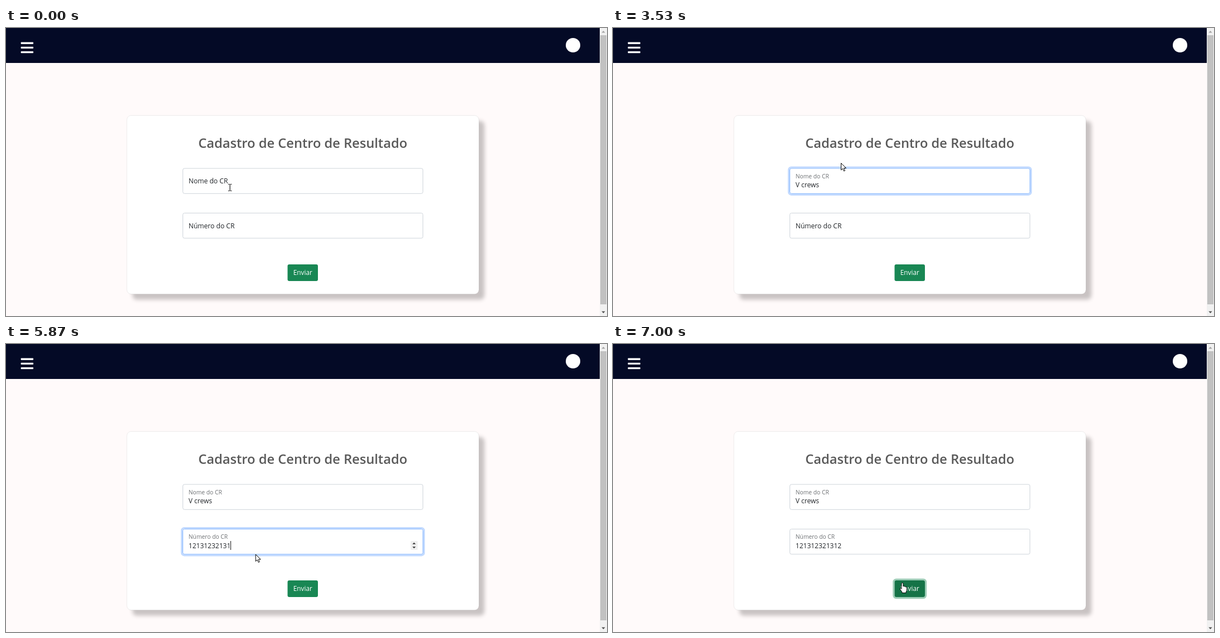
An HTML page with a canvas for the animation above (8 s loop, 1079 by 519 pixels).

```html
<!DOCTYPE html>
<html lang="pt-BR">
<head>
<meta charset="utf-8">
<title>Cadastro de Centro de Resultado</title>
<style>
  html, body { margin: 0; width: 100%; height: 100%; overflow: hidden; background: #fffafa; }
  canvas { display: block; }
</style>
</head>
<body>
<canvas id="stage" width="1079" height="519"></canvas>
<script>
const ctx = document.getElementById('stage').getContext('2d');
const LOOP = 8000;
const STEP = 1000 / 15; // the screen refreshes 15 times a second
const FONT = '"Open Sans", "Noto Sans", sans-serif';
const TEXT_X = 327.8;

const NAME = 'V crews';
const NAME_KEYS = [1670, 1870, 2070, 2200, 2530, 2730, 2870];
const NUMBER = '121312321312';
const NUMBER_KEYS = [5000, 5200, 5330, 5400, 5470, 5530, 5600, 5670, 5730, 5800, 5870, 5930];
const FOCUS_NAME = 900, FOCUS_NUMBER = 4530, SUBMIT = 6530, HOVER = 6280;

// time, x, y, shape
const POINTER = [
  [0, 402, 287, 'beam'], [70, 402, 284, 'beam'], [130, 402, 282, 'beam'],
  [870, 406, 281, 'beam'], [930, 408, 281, 'beam'],
  [3530, 409.5, 243.5, 'arrow'], [3870, 396, 256, 'beam'],
  [4070, 394, 284, 'beam'], [4130, 391, 312, 'arrow'], [4200, 390, 346, 'beam'],
  [6400, 518, 432.5, 'hand'], [6470, 520, 434, 'hand'], [6530, 522, 436, 'hand'],
  [7000, 519.5, 430.5, 'hand']
];
const GLIDE = { start: 5800, end: 6330, from: [426, 362], to: [516, 431.5] };

const HAND = new Path2D('M-1.5 11V1.4Q-1.5 0 0 0T1.5 1.4V6.2Q2.8 5.2 4 6.6Q5.2 6 6 7.3' +
  'Q8 6.8 8 9V12.5Q8 14.5 6.6 16V18H-.6V16.2L-4.2 11.4Q-4.8 9.6 -3.2 9.6Q-2.4 9.8 -1.5 11Z');
const ARROW = new Path2D('M0 0V12.5L2.9 9.8L5 14.4L7 13.5L5 9H9Z');

const ease = v => { v = Math.min(1, Math.max(0, v)); return v * v * (3 - 2 * v); };
const lerp = (a, b, k) => a + (b - a) * k;
const mix = (a, b, k) => `rgb(${a.map((v, i) => Math.round(lerp(v, b[i], k)))})`;
const within = (t, a, b) => t >= a && t < b;
const typed = (text, keys, t) => text.slice(0, keys.filter(k => t >= k).length);

function rounded(x, y, w, h, r) {
  ctx.beginPath();
  ctx.roundRect(x, y, w, h, r);
}

function rect(x, y, w, h, fill) {
  ctx.fillStyle = fill;
  ctx.fillRect(x, y, w, h);
}

function triangle(x, y, half, height, fill) {
  ctx.fillStyle = fill;
  ctx.beginPath();
  ctx.moveTo(x - half, y);
  ctx.lineTo(x + half, y);
  ctx.lineTo(x, y + height);
  ctx.fill();
}

function text(str, x, y, size, fill, weight = 400, align = 'left') {
  ctx.font = `${weight} ${size}px ${FONT}`;
  ctx.textAlign = align;
  ctx.fillStyle = fill;
  ctx.fillText(str, x, y);
}

// Soft band around a box, drawn outside its edge
function ring(x, y, w, h, r, spread, fill) {
  ctx.fillStyle = fill;
  ctx.beginPath();
  ctx.roundRect(x - spread, y - spread, w + 2 * spread, h + 2 * spread, r + spread);
  ctx.roundRect(x, y, w, h, r);
  ctx.fill('evenodd');
}

function page() {
  rect(0, 0, 1079, 519, '#fffafa');
  rect(0, 0, 1066, 63, '#040a26');
  ctx.fillStyle = '#fff';
  for (const y of [25.6, 33.8, 42]) {
    rounded(26.7, y, 22.4, 3.3, 0.8);
    ctx.fill();
  }
  ctx.beginPath();
  ctx.arc(1018, 31, 13, 0, 7);
  ctx.fill();

  rect(1066, 0, 13, 519, '#f1f1f1');
  rect(1067, 13, 11, 485, '#c1c1c1');
  triangle(1072.5, 8.5, 3.2, -3.5, '#a3a3a3');
  triangle(1072.5, 510.5, 3.2, 3.5, '#505050');

  ctx.save();
  ctx.shadowColor = '#c9c3c3';
  ctx.shadowOffsetX = ctx.shadowOffsetY = 10;
  ctx.shadowBlur = 7;
  ctx.fillStyle = '#fff';
  rounded(217, 157.5, 632, 322, 8);
  ctx.fill();
  ctx.restore();
  ctx.strokeStyle = 'rgba(0,0,0,.09)';
  ctx.lineWidth = 0.8;
  ctx.stroke();
  text('Cadastro de Centro de Resultado', 532.8, 216, 23.7, '#595959', 600, 'center');
}

function field(y, label, value, focus, lift, caret) {
  const x = 317.5, w = 431, h = 45.3;
  rounded(x, y, w, h, 3);
  ctx.fillStyle = '#fff';
  ctx.fill();
  if (focus > 0) {
    ring(x - 0.4, y - 0.4, w + 0.8, h + 0.8, 3, 3.2 * focus, `rgba(13,110,253,${0.25 * focus})`);
  }
  rounded(x, y, w, h, 3);
  ctx.strokeStyle = mix([206, 212, 218], [134, 183, 254], focus);
  ctx.lineWidth = 1;
  ctx.stroke();

  text(label, TEXT_X, y + lerp(27.3, 17.8, lift), lerp(12.1, 10.3, lift),
    `rgba(33,37,41,${lerp(1, 0.65, lift)})`);
  text(value, TEXT_X, y + 34.3, 12, '#212529');
  if (caret) rect(Math.round(TEXT_X + ctx.measureText(value).width), Math.round(y + 21.4), 1, 16, '#111');
}

function spinner() {
  ctx.fillStyle = '#efefef';
  rounded(726.5, 355, 12.5, 16, 1);
  ctx.fill();
  triangle(732.6, 360.7, 3, -3, '#333');
  triangle(732.6, 365.3, 3, 3, '#333');
}

function button(hover, focus) {
  if (focus > 0) ring(505.5, 426, 54.5, 30, 3, 3.2 * focus, `rgba(60,153,110,${0.5 * focus})`);
  ctx.fillStyle = mix([25, 135, 84], [21, 115, 71], hover);
  rounded(505.5, 426, 54.5, 30, 3);
  ctx.fill();
  text('Enviar', 532.8, 445.2, 11.8, '#fff', 400, 'center');
}

function pointerAt(t) {
  if (!within(t, GLIDE.start, GLIDE.end + 70)) return POINTER.findLast(p => t >= p[0]).slice(1);
  const k = (t - GLIDE.start) / (GLIDE.end - GLIDE.start);
  const slow = 1 - (1 - k) ** 2;
  const x = lerp(GLIDE.from[0], GLIDE.to[0], slow);
  const y = lerp(GLIDE.from[1], GLIDE.to[1], slow);
  return [x, y, y < 379 ? 'beam' : x > 505 && y > 426 ? 'hand' : 'arrow'];
}

function pointer(x, y, shape) {
  ctx.save();
  if (shape === 'beam') {
    ctx.translate(Math.round(x), Math.round(y));
    rect(-0.5, -5, 1.2, 11, '#111');
    rect(-3, -6, 2.6, 1, '#111');
    rect(0.6, -6, 2.6, 1, '#111');
    rect(-3, 6, 2.6, 1, '#111');
    rect(0.6, 6, 2.6, 1, '#111');
  } else {
    const path = shape === 'hand' ? HAND : ARROW;
    ctx.translate(x, y);
    ctx.fillStyle = '#fff';
    ctx.strokeStyle = '#000';
    ctx.lineWidth = 1;
    ctx.lineJoin = 'round';
    ctx.fill(path);
    ctx.stroke(path);
  }
  ctx.restore();
}

function draw(t) {
  const ramp = (start, length = 150) => ease((t - start) / length);
  page();
  field(253, 'Nome do CR', typed(NAME, NAME_KEYS, t),
    ramp(FOCUS_NAME) - ramp(FOCUS_NUMBER), ramp(FOCUS_NAME, 100),
    within(t, FOCUS_NAME, 1400) || within(t, 1670, 3270) || within(t, 3870, FOCUS_NUMBER));
  field(333.5, 'Número do CR', typed(NUMBER, NUMBER_KEYS, t),
    ramp(FOCUS_NUMBER) - ramp(SUBMIT), ramp(FOCUS_NUMBER, 100),
    within(t, FOCUS_NUMBER, 6470));
  if (within(t, 4200, SUBMIT)) spinner();
  button(ramp(HOVER), ramp(SUBMIT));
  pointer(...pointerAt(t));
}

function tick() {
  const step = Math.floor((performance.now() % LOOP + 4) / STEP);
  draw(Math.round(step * STEP / 10) * 10 % LOOP);
  requestAnimationFrame(tick);
}
tick();
</script>
</body>
</html>
```
